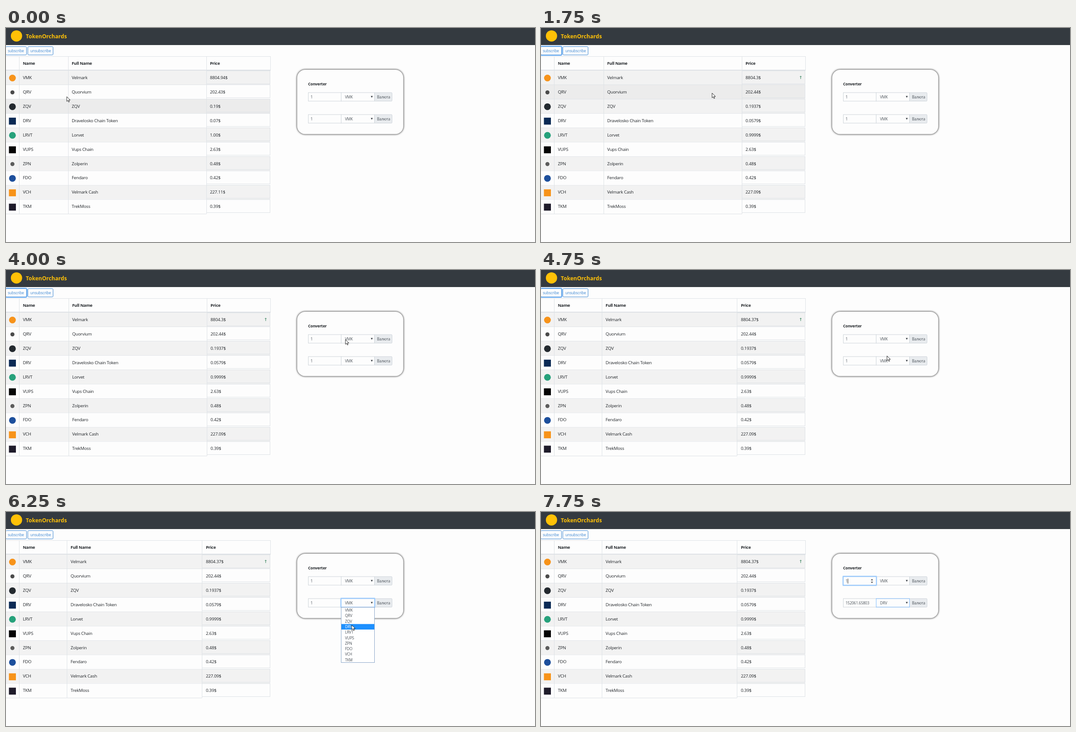
Recreate the animation shown at these times as an HTML page. Size 1175x477 px, loop 8 s.

```html
<!DOCTYPE html>
<html lang="en">
<head>
<meta charset="utf-8">
<title>Exchange table and converter</title>
<style>
html, body { margin: 0; width: 100%; height: 100%; overflow: hidden; background: #fdfdfd; }
svg { display: block; width: 1175px; height: 477px; }
text { font: 9.7px "Open Sans", "Noto Sans", sans-serif; letter-spacing: -.25px; fill: #212529; white-space: pre; }
.head { font-size: 9.4px; font-weight: 700; letter-spacing: -.3px; }
.brand { font-size: 12.1px; font-weight: 700; letter-spacing: 0; fill: #ffc107; }
.btn { font-size: 8.4px; letter-spacing: -.2px; fill: #3b86d2; }
.field { font-size: 8.4px; letter-spacing: -.2px; fill: #495057; }
.title { font-size: 8.6px; font-weight: 700; letter-spacing: -.2px; }
.card { filter: drop-shadow(0 0 2px #000); }
</style>
</head>
<body>
<svg id="stage" viewBox="0 0 1175 477"></svg>
<script>
const LOOP = 8000, STEP = 250;
const PAGE = '#fdfdfd', LINE = '#dee2e6', EDGE = '#ced4da';
const BLUE = '#007bff', OUTLINE = '#3b86d2', FOCUS = '#80bdff';

// ticker, full name, first price, live price, icon colour, icon shape
const coins = [
  ['VMK', 'Velmark', '8804.94$', '8804.3$', '#f7931a', 'circle'],
  ['QRV', 'Quorvium', '202.43$', '202.44$', '#4a4a4a', 'dot'],
  ['ZQV', 'ZQV', '0.19$', '0.1937$', '#23292f', 'circle'],
  ['DRV', 'Dravelosko Chain Token', '0.07$', '0.0579$', '#0b2a55', 'square'],
  ['LRVT', 'Lorvet', '1.00$', '0.9999$', '#26a17b', 'circle'],
  ['VUPS', 'Vups Chain', '2.63$', '2.63$', '#050505', 'square'],
  ['ZPN', 'Zolperin', '0.48$', '0.48$', '#5c5c5c', 'dot'],
  ['FDO', 'Fendaro', '0.42$', '0.42$', '#1d4f9c', 'circle'],
  ['VCH', 'Velmark Cash', '227.11$', '227.09$', '#f7931a', 'square'],
  ['TKM', 'TrekMoss', '0.39$', '0.39$', '#1f1c2b', 'square']
];

// when each table state begins: name line, price line, name text, price text
const layouts = [
  [0, 138.5, 445.5, 146, 453],
  [1500, 139.5, 446.5, 147, 454.3],
  [4500, 135.5, 435.5, 143.6, 444]
];

// time, x, y of the pointer tip
const path = [
  [0, 135, 153], [500, 95, 110], [750, 52, 72], [1000, 37.5, 51], [1250, 37.5, 51],
  [1500, 150, 95], [1750, 380, 145], [2000, 560, 172], [2250, 630, 164.5], [2500, 638, 158],
  [2750, 655, 160], [3250, 705, 174], [3500, 730, 170], [3750, 730, 170], [4000, 754, 155],
  [4500, 764, 180], [5000, 773, 203], [5500, 778, 204.5], [5750, 778, 204.5], [6000, 774, 224],
  [6250, 768, 252], [6500, 766, 254], [7000, 766, 231.5], [7250, 722, 190], [7500, 690, 156]
];

const stage = document.getElementById('stage');

function add(tag, attrs, parent = stage) {
  const el = document.createElementNS('http://www.w3.org/2000/svg', tag);
  for (const k in attrs) el.setAttribute(k, attrs[k]);
  return parent.appendChild(el);
}
const set = (el, attrs) => { for (const k in attrs) el.setAttribute(k, attrs[k]); };
const show = (el, on) => el.setAttribute('visibility', on ? 'visible' : 'hidden');
const group = () => add('g', {});
const rect = (x, y, width, height, fill, more, parent) =>
  add('rect', { x, y, width, height, fill, ...more }, parent);
const line = (x1, y1, x2, y2, stroke = LINE, parent) =>
  add('line', { x1, y1, x2, y2, stroke }, parent);
const shape = (d, fill, more, parent) => add('path', { d, fill, ...more }, parent);
function text(x, y, str, cls = '', parent) {
  const el = add('text', { x, y, class: cls }, parent);
  el.textContent = str;
  return el;
}
const rowTop = i => 95 + 31.95 * i;

function icon(color, kind, y) {
  if (kind === 'square') rect(6.5, y - 7.5, 15.5, 15.5, color);
  else add('circle', { cx: 14.3, cy: y, r: kind === 'dot' ? 4.5 : 7.5, fill: color });
}

function button(x, width, label, textX) {
  const ring = rect(x - 1, 40.5, width + 2, 20.5, 'none', { rx: 3, stroke: FOCUS, 'stroke-width': 2 });
  const box = rect(x, 41.5, width, 18.5, PAGE, { rx: 2, stroke: OUTLINE });
  return { ring, box, label: text(textX, 53.8, label, 'btn') };
}

function field(y) {
  const box = (x, w, fill) => rect(x, y, w, 19, fill, { stroke: EDGE });
  box(818.5, 39, '#e9ecef').setAttribute('rx', 1.5);
  box(671.5, 73, PAGE);
  box(744.5, 74, PAGE);
  const ring = rect(0, y - 1, 0, 21, 'none', { rx: 1, stroke: '#b5d7fb', 'stroke-width': 2 });
  const edge = rect(0, y, 0, 19, 'none', { stroke: FOCUS });
  shape(`M810.3 ${y + 7.4}h4.4l-2.2 4z`, '#343a40');
  text(824, y + 13, 'Валюта', 'field');
  const value = text(676.5, y + 13, '1', 'field');
  const ticker = text(753, y + 13, coins[0][0], 'field');
  // mark: part to outline, glow: whether the soft ring shows
  const focus = (mark, glow) => {
    const [x, w] = mark === 'amount' ? [671.5, 73] : [744.5, 74];
    set(edge, { x, width: w });
    set(ring, { x: x - 1, width: w + 2 });
    show(edge, mark);
    show(ring, mark && glow);
  };
  return { value, ticker, focus };
}

// header
rect(0, 0, 1175, 38, '#343a40');
add('circle', { cx: 23.3, cy: 17.7, r: 12.5, fill: '#ffc107' });
text(44, 22.6, 'TokenOrchards', 'brand');
const subscribe = button(-.5, 46, 'subscribe', 4);
const unsubscribe = button(48.5, 56, 'unsubscribe', 54);
show(unsubscribe.ring, false);

// table
const rows = coins.map(([tick, name, price, , color, kind], i) => {
  const y = rowTop(i), low = Math.round(y + 31.4) + .5;
  const back = rect(0, y, 587, 31.95, PAGE);
  const cell = rect(0, Math.floor(y) + .5, 0, 29, 'none', { stroke: LINE });
  const under = line(0, low, 445, low);
  icon(color, kind, y + 16.5);
  text(37.5, y + 18.8, tick);
  return { back, cell, under, name: text(146, y + 18.8, name), price: text(453, y + 18.8, price) };
});
line(0, 63.5, 588, 63.5);
rect(0, 93, 588, 2, LINE);
line(29.5, 63, 29.5, 414);
line(587.5, 63, 587.5, 95);
const nameLine = line(138.5, 63, 138.5, 414);
const priceLine = line(445.5, 63, 445.5, 414);
text(37.5, 82.3, 'Name', 'head');
const nameHead = text(146, 82.3, 'Full Name', 'head');
const priceHead = text(453, 82.3, 'Price', 'head');
const rise = shape('M576.8 113.6v-6.6M575 108.8l1.8-1.8 1.8 1.8', 'none', { stroke: '#2b7d55' });

// converter
rect(646.7, 93, 235.8, 143.5, PAGE, { rx: 18, class: 'card' });
text(671, 128.4, 'Converter', 'title');
const from = field(144), to = field(193);
const spinner = shape('M732.6 152.2h5l-2.5-3zM732.6 155.4h5l-2.5 3z', '#444');
const caret = line(681.8, 148.5, 681.8, 159.5, '#333');

const list = group();
rect(744.5, 212.5, 74, 123, '#fff', { stroke: '#8aa6c8' }, list);
const pick = rect(745, 212.8, 73, 12.3, '#1e90ff', {}, list);
const options = coins.map(([tick], i) => text(753, 222 + 12.3 * i, tick, 'field', list));

// pointers
const ink = { stroke: '#111', 'stroke-width': .9, 'stroke-linejoin': 'round' };
const arrow = shape('M0 0v10.6l2.5-2.3 1.7 3.9 1.7-.8-1.7-3.7h3.4z', '#fff', ink);
const hand = shape('M-1.2.8q1.2-1.6 2.4 0v4.4l4 .9q1.5.5 1.4 2l-.7 4.2-1 2H-.8l-3.2-4.6q-.7-1.6.8-1.6l2 1.5z', '#fff', ink);

function pointerAt(t) {
  const k = path.findIndex(p => p[0] > t);
  if (k < 0) return path[path.length - 1].slice(1);
  const [a, x1, y1] = path[k - 1], [b, x2, y2] = path[k];
  const f = (t - a) / (b - a);
  return [x1 + (x2 - x1) * f, y1 + (y2 - y1) * f];
}

function drawTable(t, x, y) {
  const state = layouts.filter(l => l[0] <= t).length - 1;
  const [, nameX, priceX, nameText, priceText] = layouts[state];
  set(nameLine, { x1: nameX, x2: nameX });
  set(priceLine, { x1: priceX, x2: priceX });
  set(nameHead, { x: nameText });
  set(priceHead, { x: priceText });
  rows.forEach((r, i) => {
    const over = x < 587 && y + 6 >= rowTop(i) && y + 6 < rowTop(i + 1);
    set(r.back, { fill: over ? '#ececec' : i % 2 ? PAGE : '#f2f2f2' });
    set(r.cell, { x: priceX, width: 586.5 - priceX });
    set(r.under, { x2: priceX });
    set(r.name, { x: nameText });
    set(r.price, { x: priceText });
    r.price.textContent = coins[i][state ? 3 : 2];
  });
  if (state === 2) rows[0].price.textContent = '8804.37$';
  show(rise, state > 0);
}

function drawButton(t, over) {
  set(subscribe.box, { fill: over ? BLUE : PAGE, stroke: over ? BLUE : OUTLINE });
  subscribe.label.style.fill = over ? '#fff' : '';
  show(subscribe.ring, t >= 1250 && t < 5500);
}

function drawConverter(t, y) {
  const open = t >= 5500 && t < 6500, chosen = t >= 6500, typing = t >= 7750;
  from.focus(typing && 'amount', true);
  to.focus(t >= 5500 && 'select', !typing);
  to.value.textContent = chosen ? '152061.65803' : '1';
  to.ticker.textContent = coins[chosen ? 3 : 0][0];
  show(spinner, t >= 7500);
  show(caret, t >= 7500);
  show(list, open);
  const at = Math.max(0, Math.floor((y - 212.8) / 12.3));
  set(pick, { y: 212.8 + 12.3 * at });
  options.forEach((o, i) => { o.style.fill = i === at ? '#fff' : ''; });
}

function draw(t) {
  const [x, y] = pointerAt(t);
  const overButton = x < 46 && y > 41 && y < 60;
  drawTable(t, x, y);
  drawButton(t, overButton);
  drawConverter(t, y);
  for (const p of [arrow, hand]) set(p, { transform: `translate(${x} ${y})` });
  show(hand, overButton);
  show(arrow, !overButton && t < 7500);
}

const start = performance.now();
let last = -1;
function tick() {
  const t = Math.floor((performance.now() - start) % LOOP / STEP) * STEP;
  if (t !== last) draw(last = t);
  requestAnimationFrame(tick);
}
tick();
</script>
</body>
</html>
```
